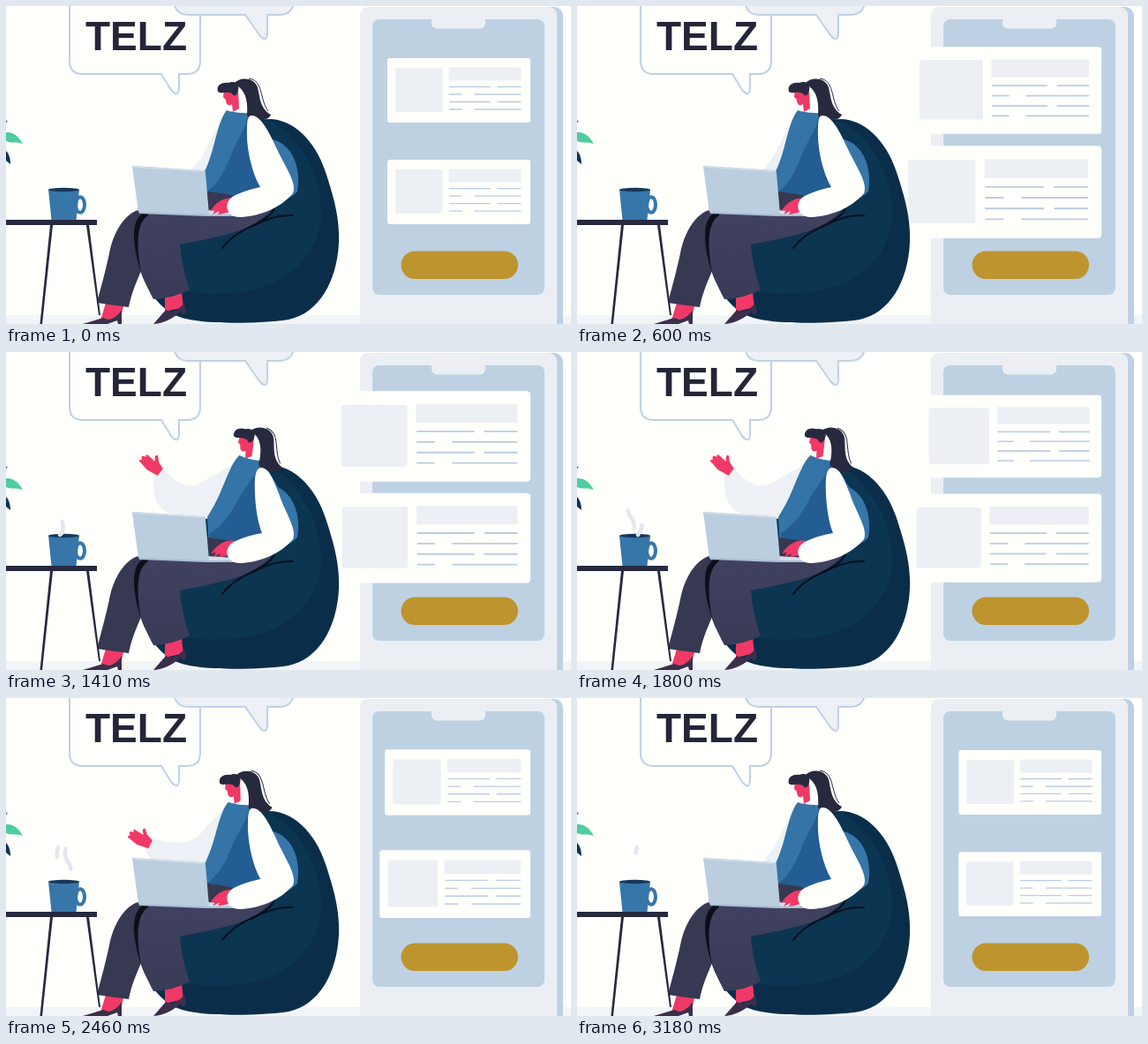
Recreate the animation shown at these times as an HTML page. Size 640 by 360 pixels, loop 3600 ms.

```html
<!DOCTYPE html>
<html lang="en">
<head>
<meta charset="utf-8">
<title>Working from a bean bag</title>
<style>
  html, body { margin: 0; width: 100%; height: 100%; overflow: hidden; background: #fffffc; }
  svg { display: block; width: 100vw; height: 100vh; }
  .skin { fill: #f03966; }
  .dark { fill: #272a3f; }
  .crease { fill: none; stroke: #0b0f1a; stroke-width: 2; stroke-linecap: round; }
  .steam { fill: none; stroke: #e4e7ec; stroke-width: 4.5; stroke-linecap: round; }
  .bubble { fill: #fffffc; stroke: #bfd1e5; stroke-width: 2; }
</style>
</head>
<body>
<svg viewBox="0 0 640 360">
  <defs>
    <linearGradient id="legFill" x2="0" y2="1">
      <stop offset="0" stop-color="#414161"/><stop offset="1" stop-color="#3a3b57"/>
    </linearGradient>
    <g id="card">
      <rect x="432" y="59" width="162" height="73" rx="3" fill="#fffffc"/>
      <g fill="#ecf0f4">
        <rect x="441" y="70" width="53.500" height="50" rx="2"/>
        <rect x="501.500" y="69.500" width="82" height="15"/>
      </g>
      <path d="M502 91.500h46.500m8 0h27M502 108.500h46.500m8 0h27M502 100h14.500m14 0h53M502 117h14.500m14 0h53" stroke="#bacde0" stroke-width="1.300"/>
    </g>
  </defs>

  <rect width="640" height="360" fill="#fffffc"/>
  <rect y="350" width="640" height="10" fill="#f2f5f7"/>

  <!-- speech bubbles -->
  <path class="bubble" d="M72-5V62Q72 77 87 77H176L187 95Q195 104 196 94V77H205Q220 77 220 62V-5"/>
  <path class="bubble" style="fill:#edf0f4" d="M190-5Q192 10 206 10H271L287 33Q295 42 296 32V10H311Q325 9 326-5"/>
  <text x="90" y="49.500" font-family="'Liberation Sans', Arial, sans-serif" font-weight="700" font-size="46" fill="#242638">TELZ</text>

  <!-- phone -->
  <rect x="420" y="1" width="211" height="380" rx="10" fill="#bed1e4"/>
  <rect x="401" y="1" width="223" height="380" rx="9" fill="#ebeff3"/>
  <rect x="415" y="15" width="195" height="312" rx="8" fill="#bed1e3"/>
  <rect x="482" y="6" width="61" height="19.500" rx="6" fill="#ebeff3"/>
  <rect x="447.500" y="277.500" width="132.500" height="31.500" rx="15.700" fill="#be942e"/>
  <use href="#card" id="card1"/>
  <use href="#card" id="card2"/>

  <!-- bean bag -->
  <path fill="#0a2e4a" d="M280 132C312 118 347 143 362 188C371 216 378 238 377 268C375 312 354 348 320 355C285 360 235 360 208 355C165 348 146 300 145 250L160 232Z"/>
  <path fill="#0c3552" d="M280 132L300 130C340 155 358 200 357 240C352 290 310 323 250 325C215 327 185 322 157 312C149 293 145 272 145 250L160 232Z"/>
  <path class="crease" d="M325 237C305 236 290 243 278 250M304 229C298 246 262 250 245 274"/>

  <!-- raised arm -->
  <path id="farArm" fill="#edf0f4"/>
  <path id="farHand" class="skin" d="M4-5L-4-8L-9-13Q-12-14-11-10L-8-6L-19-7Q-22-6-19-4L-22-3Q-25-1-21 1L-23 3Q-23 5-19 5L-10 7L4 5Z"/>

  <path fill="#3776a9" d="M296 150C322 152 335 180 330 210C318 222 300 226 285 224Z"/>
  <g id="torso">
    <path fill="#3574a6" d="M251 117C244 124 240 140 236 155C231 175 226 185 223 192L228 220H300V150L276 121Q262 122 251 117Z"/>
    <path fill="#235d93" d="M274 121C274 136 262 150 255 168C248 188 238 203 228 210V220H300L302 160Z"/>
    <path fill="#fffffc" d="M254 113L269 114L273 120Q262 122 250 118Z"/>
    <g id="head">
      <path class="skin" d="M247 95L246 103L249 106C249 112 253 114 256 111L257 120L264 116L263 95Z"/>
      <path class="dark" d="M240 97C238 90 244 86 252 87C258 84 265 88 263 95C262 102 258 103 256 99C250 96 246 99 242 98Z"/>
      <path class="dark" d="M258 88C264 80 281 80 285 92C288 105 288 116 300 123C297 131 281 132 273 124C274 112 273 98 263 91Z"/>
      <path fill="none" stroke="#272a3f" d="M275 82C292 84 287 106 297 119"/>
    </g>
  </g>

  <!-- legs and shoes -->
  <path class="skin" d="M113 336L133 340L130 352L107 356ZM180 328L199 324L201 341L180 346Z"/>
  <path fill="#3b2f4c" d="M87 360L110 353C118 357 126 352 131 344L131 360H127L126 356L115 360ZM167 360L181 344C190 349 197 342 202 336L204 347L200 350L198 346C190 353 180 359 167 360Z"/>
  <path fill="#373851" d="M228 210L250 213L300 226L235 250L175 258L153 300C148 312 142 325 139 341L103 336C107 320 113 300 118 275C124 250 138 234 150 231Z"/>
  <path fill="url(#legFill)" d="M303 228C285 238 255 236 230 236L161 234C145 236 143 255 147 280C151 302 160 318 167 332Q190 331 208 321C202 305 198 285 197 270C220 265 255 260 276 249Q292 242 303 228Z"/>
  <path fill="#0b0f1a" d="M161 233C143 235 140 262 153 302C147 270 148 245 161 237Z"/>

  <!-- laptop -->
  <path fill="#a9bfd4" d="M150 232L230 235L262 232Q265 236 258 238L226 238L151 235Z"/>
  <path fill="#d3deea" d="M228 231L262 233L255 236L229 236Z"/>
  <path fill="#bacee0" d="M143 182Q143 180 146 181L223 186Q226 186 226 189L230 236L150 233Z"/>
  <path fill="none" stroke="#d2deea" stroke-width="1.500" d="M144 182L224 187"/>

  <path id="nearHand" class="skin" d="M258 218C249 216 241 221 236 226L231 232L237 231L234 236L242 232L240 236C250 235 257 232 259 228Z"/>
  <path id="nearArm" fill="#fffffc"/>

  <!-- plant, table and mug -->
  <path fill="#4fcda0" d="M0 143C8 142 15 148 19 156C12 153 6 156 0 153Z"/>
  <path fill="#0c3353" d="M0 164C4 168 5 174 5 179L0 175Z"/>
  <path fill="#3776a9" d="M0 129L2 131L0 132Z"/>
  <path class="dark" d="M0 242H103V248H94L107 350L105 350L91 248H53L41 360H38.500L50 248H0Z"/>
  <ellipse cx="84" cy="225" rx="5" ry="8.800" fill="none" stroke="#3776a9" stroke-width="4"/>
  <path fill="#3776a9" d="M48 208H83L79.500 242H51.500Z"/>
  <ellipse cx="65.500" cy="208" rx="17.500" ry="2.200" fill="#17375a"/>
  <path id="steam1" class="steam" pathLength="1" d="M61 207C67 203 65 192 61 187C57 182 57 176 59 169"/>
  <path id="steam2" class="steam" pathLength="1" d="M69 207C76 198 74 190 70 185C66 180 66 175 68 169"/>
</svg>

<script>
const $ = id => document.getElementById(id);
const clamp = v => Math.max(0, Math.min(1, v));
const easeIn = q => q * q;
const easeOut = q => 1 - (1 - q) * (1 - q);

// Accelerates from 0 to 1, then rings like a spring.
function spring(t, start, end) {
  if (t < end) return easeIn(clamp((t - start) / (end - start)));
  const s = (t - end) / 1000;
  return 1 + 0.6 * Math.exp(-3.5 * s) * Math.sin(11.2 * s);
}

// lean, hand angle, then shoulder, inner elbow, cuff top, cuff bottom, outer elbow, elbow base, side
const typing  = [0, 0, 250, 117, 213, 188, 172, 219, 172, 232, 190, 240, 215, 232, 244, 190];
const lifting = [.85, 51, 262, 121, 206, 165, 185, 138, 174, 147, 175, 185, 198, 187, 236, 190];
const talking = [1, 37, 268, 121, 200, 160, 176, 129, 167, 138, 164, 181, 192, 184, 236, 190];
const resting = [.12, 27, 252, 118, 205, 171, 163, 158, 157, 170, 162, 190, 200, 195, 236, 192];

const moves = [
  [600, 1080, typing, lifting, easeIn],
  [1080, 1380, lifting, talking, easeOut],
  [2080, 2460, talking, resting, easeIn],
  [2460, 2790, resting, typing, easeOut]
];

function poseAt(t) {
  let pose = typing;
  for (const [start, end, a, b, ease] of moves) {
    if (t < start) break;
    const q = ease(clamp((t - start) / (end - start)));
    pose = a.map((v, i) => v + (b[i] - v) * q);
  }
  return pose;
}

function drawBody(t) {
  const [l, angle, ax, ay, bx, by, cx, cy, dx, dy, ex, ey, fx, fy, gx, gy] = poseAt(t);
  $('farArm').setAttribute('d',
    `M${ax} ${ay}L${ax + (bx - ax) * .7} ${ay + (by - ay) * .7}Q${bx} ${by} ${cx} ${cy}` +
    `L${dx} ${dy}Q${ex} ${ey} ${fx} ${fy}L${gx} ${gy}Z`);
  $('farHand').setAttribute('transform', `translate(${(cx + dx) / 2} ${(cy + dy) / 2}) rotate(${angle})`);
  $('torso').setAttribute('transform', `rotate(${7.5 * l} 265 228)`);
  $('head').setAttribute('transform', `translate(0 ${l}) rotate(${2 * l} 262 118)`);
  $('nearHand').setAttribute('transform', `translate(${l} ${-4 * l})`);
  const topX = 278 + 11 * l, topY = 124 + 7 * l;
  $('nearArm').setAttribute('d',
    `M${topX} ${topY}C${289 + 9 * l} ${topY} ${298 + 5 * l} ${143 + 2 * l} ${306 + 3 * l} 160` +
    `C316 182 330 200 325 212C310 230 285 238 266 239C249 240 245 222 258 215` +
    `C270 209 280 207 ${288 + 2 * l} 205C${278 + 5 * l} 188 ${272 + 9 * l} 160 ${273 + 9 * l} ${140 + 3 * l}` +
    `C${273 + 10 * l} ${130 + 5 * l} ${274 + 11 * l} ${topY} ${topX} ${topY}Z`);
}

function drawCard(id, y, t, up, down) {
  const scale = 1 + 0.4 * (spring(t, ...up) - spring(t, ...down));
  $(id).setAttribute('transform', `translate(593.700 ${y}) scale(${scale}) translate(-593.700 -95.500)`);
}

function drawSteam(id, head, tail) {
  const from = clamp(tail), length = clamp(head) - from, style = $(id).style;
  style.display = length > 0 ? '' : 'none';
  style.strokeDasharray = `${length} 2`;
  style.strokeDashoffset = -from;
}

function frame() {
  const t = Math.min(3180, Math.floor(performance.now() % 3600 / 30) * 30);
  drawCard('card1', 95.5, t, [130, 245], [1627, 1942]);
  drawCard('card2', 210.6, t, [200, 350], [1715, 2035]);
  drawBody(t);
  drawSteam('steam1', (t - 970) / 1110, (t - 1560) / 1250);
  drawSteam('steam2', (t - 1500) / 1000, (t - 1960) / 1430);
  requestAnimationFrame(frame);
}
frame();
</script>
</body>
</html>
```
